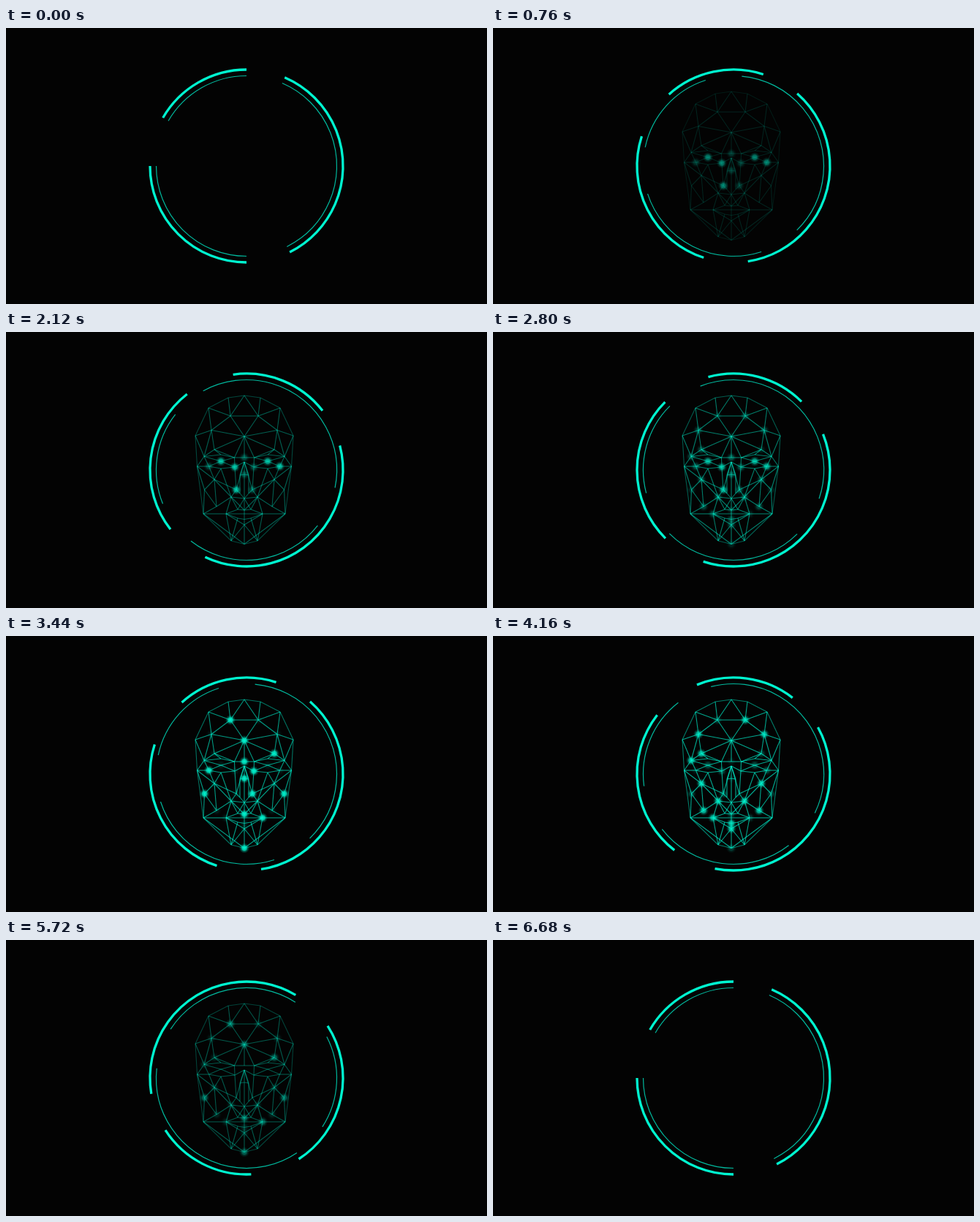
Animation of 658x378 px, one loop 6760 ms. Source, as an HTML page with a canvas:

```html
<!DOCTYPE html>
<html lang="en">
<head>
<meta charset="utf-8">
<title>Face scan</title>
<style>
html, body { margin: 0; width: 100%; height: 100%; overflow: hidden; background: #030303; }
canvas { display: block; width: 658px; height: 378px; }
</style>
</head>
<body>
<canvas id="stage" width="658" height="378"></canvas>
<script>
const ctx = document.getElementById('stage').getContext('2d');
const LOOP = 6760, STEP = 40, END = 6640;
const COLOR = '#00f5d0';
const MID = 326;

// Left half of the face: offset from the middle line, height
const nodes = {
  a: [0, 87], b: [-22, 90], c: [-49, 104], d: [-67, 142], e: [-64.5, 184],
  f: [-56, 249], g: [-18, 286], h: [0, 290.5], i: [-19, 115], j: [-45, 134.5],
  k: [0, 143], l: [-41, 161], m: [-55, 170.5], n: [-13.5, 172], o: [0, 172],
  p: [-48.5, 184], q: [-32, 177], r: [-13, 185], s: [-32, 187], t: [0, 178],
  u: [0, 195], v: [-11, 216], w: [-6, 221], x: [0, 228], y: [-18, 226],
  z: [-41, 202], A: [-54.5, 216], B: [-38, 239], C: [-25, 249], D: [-9, 243],
  E: [0, 244], F: [-9, 255], G: [0, 256.5], H: [0, 264], I: [-6, 196], J: [-32, 168]
};
const outline = 'ab bc cd de ef fg gh'.split(' ');
const mesh = ('ai bi ci cj ij ii ik jk dj dm jm jl kl kn ko lm ln me mp mq lJ mJ Jn no nq nr ' +
  'ep pq qr ps sr tr tv tI Iw Iu tu ux rv vw wx vy yx zp ze zA zy zB zs zv sy ' +
  'Ae Af AB Bf By fC yC yD yE xE xD CD DE CC CF FG GE GH Hh Hg Fg Cg CH fh').split(' ');

// A quote mark selects the node on the right half
const dots = {
  early: ["o p r' u v'", "q q' r p' v"],
  late: ["i k l' A A' E C' h", "i' j j' l m z z' y y' B B' C G H"]
};

function place(key, side) {
  const [dx, y] = nodes[key];
  return [MID + dx * side, y];
}

// Linear interpolation through [time, value] stops
function track(t, stops) {
  for (let n = 1; n < stops.length; n++) {
    const [t0, v0] = stops[n - 1], [t1, v1] = stops[n];
    if (t <= t1) return v0 + (v1 - v0) * (t - t0) / (t1 - t0);
  }
  return stops[stops.length - 1][1];
}

const turn = t => track(t, [[0, 0], [2400, 60], [3825, 0], [END, 360]]);
const faceAlpha = t => track(t, [[0, 0], [3700, 1], [4800, 1], [END, 0]]);
const earlyAlpha = t => track(t, [[0, 0], [1000, 0.9], [2400, 1], [3600, 1], [4500, 0]]);
const lateAlpha = t => track(t, [[0, 0], [2300, 0], [3400, 1], [4800, 1], [END, 0]]);

function ring(radius, width, alpha, angle) {
  ctx.lineWidth = width;
  ctx.globalAlpha = alpha;
  for (const [from, to] of [[300, 360], [23.3, 153.4], [180, 270]]) {
    ctx.beginPath();
    ctx.arc(329, 189, radius, (from + angle - 90) * Math.PI / 180, (to + angle - 90) * Math.PI / 180);
    ctx.stroke();
  }
}

function line(p, q) {
  ctx.beginPath();
  ctx.moveTo(...p);
  ctx.lineTo(...q);
  ctx.stroke();
}

function edges(list, alpha) {
  ctx.globalAlpha = alpha;
  for (const [p, q] of list) {
    if (p === q) {
      line(place(p, 1), place(p, -1));
      continue;
    }
    line(place(p, 1), place(q, 1));
    if (nodes[p][0] || nodes[q][0]) line(place(p, -1), place(q, -1));
  }
}

const glow = ctx.createRadialGradient(0, 0, 0, 0, 0, 7);
glow.addColorStop(0, 'rgba(0,245,208,1)');
glow.addColorStop(0.42, 'rgba(0,245,208,0.85)');
glow.addColorStop(0.68, 'rgba(0,245,208,0.3)');
glow.addColorStop(1, 'rgba(0,245,208,0)');

function glowDots(names, alpha) {
  if (alpha <= 0) return;
  ctx.globalAlpha = alpha;
  ctx.fillStyle = glow;
  for (const name of names.split(' ')) {
    const [x, y] = place(name[0], name[1] ? -1 : 1);
    ctx.save();
    ctx.translate(x, y);
    ctx.fillRect(-7, -7, 14, 14);
    ctx.restore();
  }
}

function draw(time) {
  const t = Math.min(END, Math.max(0, time - STEP));
  ctx.globalAlpha = 1;
  ctx.fillStyle = '#030303';
  ctx.fillRect(0, 0, 658, 378);
  ctx.strokeStyle = COLOR;

  const angle = turn(t);
  ring(132, 3.3, 1, angle);
  ring(123.5, 1.2, 0.75, -angle);

  const face = faceAlpha(t);
  ctx.lineWidth = 1.1;
  edges(outline, face * 0.5);
  edges(mesh, face * 0.68);

  // Two sets of dots take turns, one pulse every two seconds
  const pulse = 0.5 + 0.5 * Math.cos((t - 1400) / 1000 * Math.PI);
  const levels = [pulse, 1 - pulse].map(v => 0.12 + 0.83 * v);
  levels.forEach((level, n) => {
    glowDots(dots.early[n], level * earlyAlpha(t));
    glowDots(dots.late[n], level * lateAlpha(t));
  });
}

const start = performance.now();
function tick() {
  const time = (performance.now() - start) % LOOP;
  draw(Math.floor((time + 0.5) / STEP) * STEP);
  requestAnimationFrame(tick);
}
tick();
</script>
</body>
</html>
```
